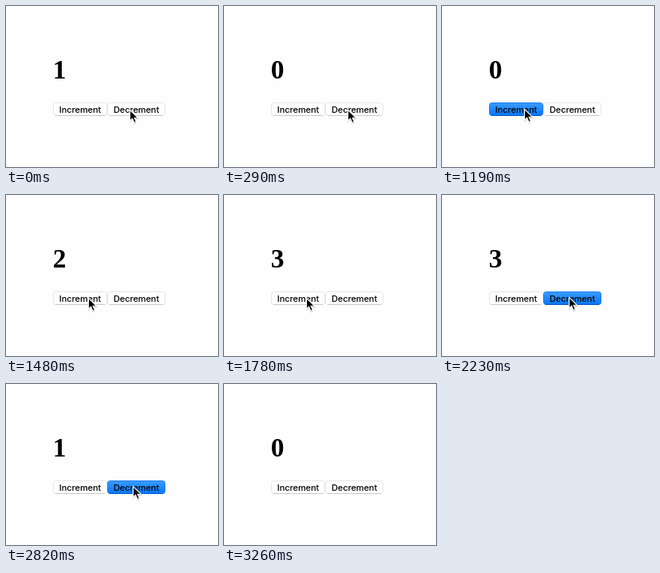
Animation, 266 px wide and 202 px high, one loop 3.55 s. Source, as an HTML page:

```html
<!DOCTYPE html>
<html lang="en">
<head>
<meta charset="utf-8">
<title>Counter</title>
<style>
  html, body { margin: 0; width: 100%; height: 100%; overflow: hidden; background: #fefefe; }
  svg { display: block; width: 266px; height: 202px; }
  #count { font: bold 33.5px "Liberation Serif", serif; }
  .button text { font: 500 11px Inter, sans-serif; letter-spacing: -0.08px; text-anchor: middle; }
  .face { fill: #fff; stroke: #e6e6e6; }
  .edge { stroke: #c8c8c8; }
  .pressed .face { fill: url(#blue); stroke: #1f80ee; }
  .pressed .edge { stroke: #0759c9; }
</style>
</head>
<body>
<svg viewBox="0 0 266 202">
  <defs>
    <linearGradient id="blue" x2="0" y2="1">
      <stop stop-color="#3b9cff"/>
      <stop offset="1" stop-color="#0576fb"/>
    </linearGradient>
    <filter id="shadow" x="-50%" y="-50%" width="200%" height="200%">
      <feDropShadow dx="0" dy="0.7" stdDeviation="0.6" flood-opacity="0.4"/>
    </filter>
  </defs>
  <text id="count" x="58.7" y="91"></text>
  <g id="increment" class="button">
    <rect class="face" x="59.5" y="121.5" width="67" height="16" rx="3"/>
    <path class="edge" d="M62 137.5h62"/>
    <text x="93" y="134">Increment</text>
  </g>
  <g id="decrement" class="button">
    <rect class="face" x="127.5" y="121.5" width="72" height="16" rx="3"/>
    <path class="edge" d="M130 137.5h67"/>
    <text x="163.5" y="134">Decrement</text>
  </g>
  <path id="cursor" d="M1.5 1.5V15L4.6 12.1L7 17.6L9.4 16.6L7.1 11.2H11.4Z"
        stroke="#fff" stroke-width="1.1" filter="url(#shadow)"/>
</svg>
<script>
  const LOOP = 3550;
  const STEP = 148.2;
  const LEAD = 7;
  const find = id => document.getElementById(id);

  // Steps at which a click counts; a held click shows its button pressed one step earlier.
  const buttons = {
    increment: { change: 1, held: [9], quick: [10, 12] },
    decrement: { change: -1, held: [2, 16, 18, 20], quick: [] }
  };

  // Eased cursor moves: first step, length in steps, offset and easing power.
  const origin = { x: 154, y: 129 };
  const moves = [
    { start: 5, length: 2, dx: -52, dy: -1, power: 0.8 },
    { start: 12, length: 2, dx: 56, dy: -1, power: 0.3 },
    { start: 19, length: 3, dx: 162, dy: 157, power: 2 }
  ];

  function cursorAt(step) {
    let { x, y } = origin;
    for (const { start, length, dx, dy, power } of moves) {
      const progress = Math.min(1, Math.max(0, (step - start) / length)) ** power;
      x += dx * progress;
      y += dy * progress;
    }
    return [Math.round(x), Math.round(y)];
  }

  function draw() {
    const step = Math.floor((performance.now() % LOOP + LEAD) / STEP);
    let count = 1;
    for (const [id, { change, held, quick }] of Object.entries(buttons)) {
      count += change * [...held, ...quick].filter(click => click <= step).length;
      find(id).classList.toggle("pressed", held.includes(step + 1));
    }
    find("count").textContent = count;
    find("cursor").setAttribute("transform", `translate(${cursorAt(step)})`);
    requestAnimationFrame(draw);
  }

  draw();
</script>
</body>
</html>
```
